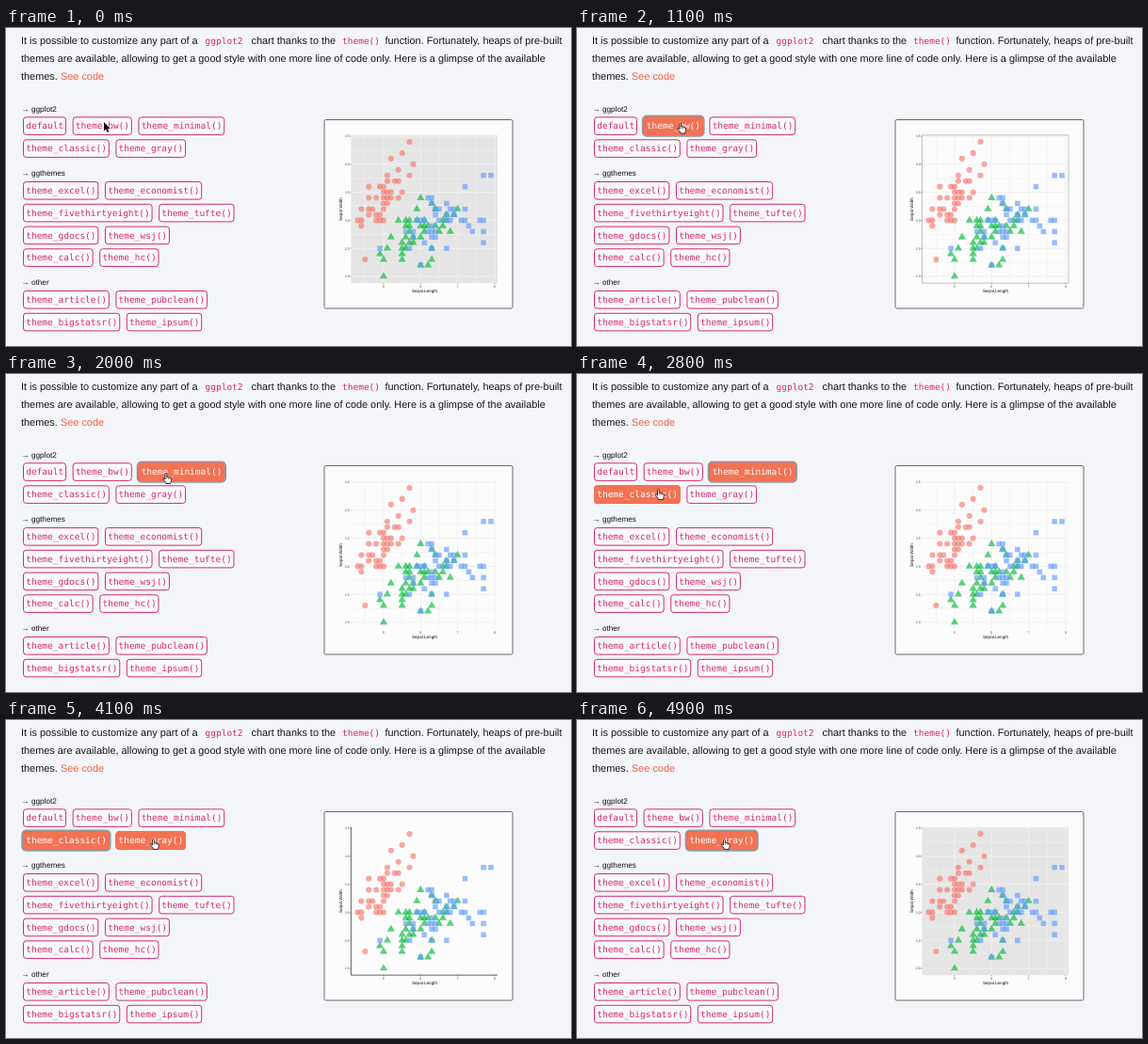
An HTML page with a canvas for the animation above (5000 ms loop, 600 px wide and 338 px high).

```html
<!DOCTYPE html>
<html lang="en">
<head>
<meta charset="utf-8">
<title>Theme picker</title>
<style>
  html, body { margin: 0; height: 100%; overflow: hidden; background: #f4f5f9; }
  canvas { display: block; width: 600px; height: 338px; }
</style>
</head>
<body>
<canvas id="stage"></canvas>
<script>
const canvas = document.getElementById('stage');
const c = canvas.getContext('2d');
const dpr = window.devicePixelRatio || 1;
canvas.width = 600 * dpr;
canvas.height = 338 * dpr;

const LOOP = 5000, STEP = 100;
const SANS = '"Liberation Sans", Arial, sans-serif';
const MONO = '"DejaVu Sans Mono", monospace';
const PINK = '#d52a6c', CORAL = '#f37254';
const CHAR = 5.72;

const headings = [['ggplot2', 88.5], ['ggthemes', 157], ['other', 273]];
const rows = [
  [104, 'default', 'theme_bw()', 'theme_minimal()'],
  [128, 'theme_classic()', 'theme_gray()'],
  [172.7, 'theme_excel()', 'theme_economist()'],
  [196.5, 'theme_fivethirtyeight()', 'theme_tufte()'],
  [220.3, 'theme_gdocs()', 'theme_wsj()'],
  [244, 'theme_calc()', 'theme_hc()'],
  [288.7, 'theme_article()', 'theme_pubclean()'],
  [312.5, 'theme_bigstatsr()', 'theme_ipsum()'],
];
const buttons = rows.flatMap(([y, ...labels]) => {
  let x = 18.5;
  return labels.map(label => {
    const w = label.length * CHAR + 5, b = { label, x, y, w };
    x += w + 7.6;
    return b;
  });
});

// When each button is hovered, left, clicked and blurred
const visits = {
  'theme_bw()': { enter: 50, leave: 1400, click: 700, blur: 1800 },
  'theme_minimal()': { enter: 1450, leave: 2400, click: 1800, blur: 3000 },
  'theme_classic()': { enter: 2500, leave: 3700, click: 3000, blur: 4350 },
  'theme_gray()': { enter: 3750, leave: LOOP, click: 4350, blur: LOOP },
};
// Pointer tip moves: start, end, x, y
const moves = [
  [0, 300, 109, 101],
  [1200, 1650, 169, 105.5],
  [2250, 2700, 85.5, 122.5],
  [3500, 3950, 155.5, 126.5],
];

// Iris sepals in tenths of a centimetre: width, then the lengths found at it
const setosa = [
  [44, 57], [42, 55], [41, 52], [40, 58], [39, 54], [38, 51, 57],
  [37, 51, 53, 54], [36, 46, 49, 50], [35, 50, 51, 52, 55],
  [34, 46, 48, 50, 51, 52, 54], [33, 50, 51], [32, 44, 46, 47, 50],
  [31, 46, 48, 49], [30, 43, 44, 48, 49, 50], [29, 44], [23, 45],
];
const versicolor = [
  [34, 60], [33, 63], [32, 59, 64, 70], [31, 67, 69],
  [30, 54, 56, 57, 59, 61, 66, 67], [29, 56, 57, 60, 61, 62, 64, 66],
  [28, 57, 61, 65, 68], [27, 52, 56, 58, 60], [26, 55, 57, 58],
  [25, 51, 55, 56, 63], [24, 49, 55], [23, 50, 55, 63], [22, 60, 62], [20, 50],
];
const virginica = [
  [38, 77, 79], [36, 72], [34, 62, 63], [33, 63, 67], [32, 64, 65, 68, 69, 72],
  [31, 64, 67, 69], [30, 59, 60, 61, 65, 67, 68, 71, 72, 76, 77], [29, 63, 73],
  [28, 56, 58, 62, 63, 64, 74, 77], [27, 58, 63, 64], [26, 61, 77],
  [25, 49, 57, 63, 67], [22, 60],
];

const px = v => 401 + (v - 5) * 39.3;
const py = v => 264 - (v - 2) * 59.6;
const panel = { l: px(4.12), r: px(8.08), t: py(4.52), b: py(1.88) };

const clamp = v => Math.max(0, Math.min(1, v));
const fade = (t, a, b) => clamp((t - a) / 150) * (b < LOOP ? 1 - clamp((t - b) / 150) : 1);
const ease = v => v * v * (3 - 2 * v);

function text(str, x, y, size, color, family = SANS, align = 'left') {
  c.font = `${size}px ${family}`;
  c.fillStyle = color;
  c.textAlign = align;
  c.fillText(str, x, y);
}

function line(x1, y1, x2, y2, color, width) {
  c.strokeStyle = color;
  c.lineWidth = width;
  c.beginPath();
  c.moveTo(x1, y1);
  c.lineTo(x2, y2);
  c.stroke();
}

function box(x, y, w, h, r, fill, stroke, width = 1) {
  c.beginPath();
  c.roundRect(x, y, w, h, r);
  if (fill) { c.fillStyle = fill; c.fill(); }
  if (stroke) { c.strokeStyle = stroke; c.lineWidth = width; c.stroke(); }
}

function drawIntro() {
  const ink = '#151515', size = 10.9;
  text('It is possible to customize any part of a', 16, 17, size, ink);
  text('ggplot2', 211.5, 17, 9.5, PINK, MONO);
  text('chart thanks to the', 260.5, 17, size, ink);
  text('theme()', 357, 17, 9.5, PINK, MONO);
  text('function. Fortunately, heaps of pre-built', 402.5, 17, size, ink);
  text('themes are available, allowing to get a good style with one more line of code only. Here is a glimpse of the available', 16, 36, size, ink);
  text('themes.', 16, 55, size, ink);
  text('See code', 58, 55, size, '#f2603f');
  for (const [name, y] of headings) text('→ ' + name, 16.5, y, 8.2, '#111');
}

function drawButton({ label, x, y, w }, t) {
  const v = visits[label];
  const focus = v ? fade(t, v.click, v.blur) : 0;
  const lit = v ? Math.max(focus, fade(t, v.enter, v.leave)) : 0;
  const top = y - 9.2, h = 18.6;
  if (focus) {
    c.globalAlpha = focus;
    box(x - 1.2, top - 1.2, w + 2.4, h + 2.4, 4, null, '#969da1', 2.2);
    c.globalAlpha = 1;
  }
  box(x, top, w, h, 2.8, '#f9f9fc', PINK);
  text(label, x + 2.7, y + 3.2, 9.5, PINK, MONO);
  if (lit) {
    c.globalAlpha = lit;
    box(x, top, w, h, 2.8, CORAL, CORAL);
    text(label, x + 2.7, y + 3.2, 9.5, '#fff', MONO);
    c.globalAlpha = 1;
  }
}

function drawPanel(theme) {
  const { l, r, t, b } = panel;
  const gray = theme === 'theme_gray()', classic = theme === 'theme_classic()';
  if (gray) box(l, t, r - l, b - t, 0, '#e5e5e5');
  if (!classic) {
    const color = gray ? '#f6f6f6' : '#e8e8e8';
    for (let i = 0; i < 8; i++) {
      const x = px(4.5 + i / 2);
      line(x, t, x, b, color, i % 2 ? 0.6 : 0.35);
    }
    for (let i = 0; i < 11; i++) {
      const y = py(2 + i / 4);
      line(l, y, r, y, color, i % 2 ? 0.35 : 0.6);
    }
  }
  if (theme === 'theme_bw()') box(l, t, r - l, b - t, 0, null, '#999', 0.6);
  if (classic) {
    line(l, t, l, b, '#222', 0.7);
    line(l, b, r, b, '#222', 0.7);
  }
  const ticks = theme !== 'theme_minimal()';
  for (let v = 5; v <= 8; v++) {
    if (ticks) line(px(v), b, px(v), b + 1.2, '#444', 0.5);
    text(v, px(v), 275.7, 3.6, '#4d4d4d', SANS, 'center');
  }
  for (let v = 2; v <= 4.5; v += 0.5) {
    if (ticks) line(l - 1.2, py(v), l, py(v), '#444', 0.5);
    text(v.toFixed(1), 364.7, py(v) + 1.3, 3.6, '#4d4d4d', SANS, 'right');
  }
}

const marks = {
  circle(x, y) { c.arc(x, y, 3.05, 0, 7); },
  triangle(x, y) {
    c.moveTo(x, y - 4.7);
    c.lineTo(x + 4.05, y + 2.35);
    c.lineTo(x - 4.05, y + 2.35);
  },
  square(x, y) { c.rect(x - 2.75, y - 2.75, 5.5, 5.5); },
};

function drawPoints(data, mark, color) {
  c.fillStyle = color;
  for (const [width, ...lengths] of data) {
    for (const length of lengths) {
      c.beginPath();
      marks[mark](px(length / 10), py(width / 10));
      c.fill();
    }
  }
}

function drawChart(t) {
  let theme = 'theme_gray()';
  for (const name in visits) if (t >= visits[name].click) theme = name;
  box(338, 97.5, 200, 200.5, 1.5, '#fcfcfd', '#686868', 1);
  drawPanel(theme);
  text('Sepal.Length', 444.5, 281.3, 4.6, '#111', SANS, 'center');
  c.save();
  c.translate(357.3, 192.5);
  c.rotate(-Math.PI / 2);
  text('Sepal.Width', 0, 0, 4.6, '#111', SANS, 'center');
  c.restore();
  c.globalAlpha = 0.65;
  drawPoints(setosa, 'circle', '#f8766d');
  drawPoints(versicolor, 'triangle', '#00ba38');
  drawPoints(virginica, 'square', '#619cff');
  c.globalAlpha = 1;
}

const arrow = new Path2D('M0 0V9.6L2.2 7.6L3.7 11L5.3 10.3L3.8 7H6.8Z');
const hand = new Path2D('M0 1Q0 0 .9 0T1.8 1V4Q3 3.5 3.5 4.3Q4.7 3.9 5.1 4.8Q6.6 4.5 6.7 6V7.6Q6.6 9 5.8 9.8V11H.9V10L-2.1 6.5Q-2.4 5.4 -1.2 5.5L0 6.5Z');

function drawPointer(t) {
  let x = 104, y = 100;
  for (const [a, b, toX, toY] of moves) {
    const k = ease(clamp((t - a) / (b - a)));
    x += (toX - x) * k;
    y += (toY - y) * k;
  }
  const over = Object.values(visits).some(v => t >= v.enter && t < v.leave);
  c.save();
  c.translate(x, y);
  c.lineJoin = 'round';
  if (over) {
    c.fillStyle = '#fff';
    c.fill(hand);
    c.strokeStyle = '#222';
    c.lineWidth = 0.9;
    c.stroke(hand);
    for (const k of [1.8, 3.5, 5.1]) line(k, 4.3, k, 6.2, '#222', 0.5);
  } else {
    c.strokeStyle = '#fff';
    c.lineWidth = 1.4;
    c.stroke(arrow);
    c.fillStyle = '#000';
    c.fill(arrow);
  }
  c.restore();
}

function draw(now) {
  const t = Math.floor((now % LOOP) / STEP) * STEP;
  c.setTransform(dpr, 0, 0, dpr, 0, 0);
  c.textRendering = 'geometricPrecision';
  c.fillStyle = '#f4f5f9';
  c.fillRect(0, 0, 600, 338);
  drawIntro();
  for (const b of buttons) drawButton(b, t);
  drawChart(t);
  drawPointer(t);
}

let start;
function tick(now) {
  start ??= now;
  draw(now - start);
  requestAnimationFrame(tick);
}
draw(0);
requestAnimationFrame(tick);
</script>
</body>
</html>
```
